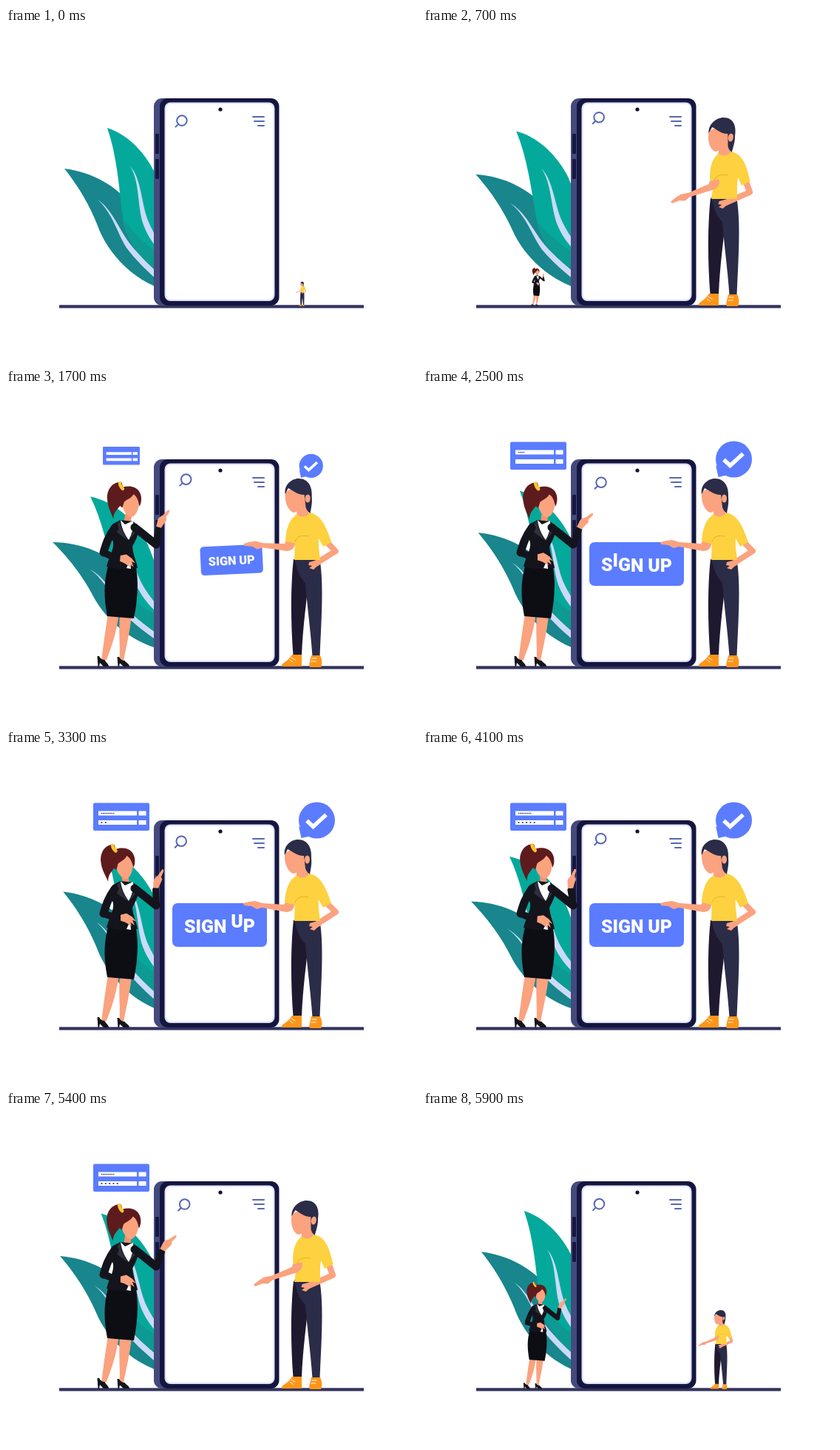
These frames come from a looping animation (556 by 450 pixels, 6000 ms). An HTML page:

```html
<!DOCTYPE html>
<html lang="en">
<head>
<meta charset="utf-8">
<title>Sign up</title>
<style>
  html, body { margin: 0; width: 100%; height: 100%; overflow: hidden; background: #fff; }
  svg { display: block; width: 556px; height: 450px; }
  .skin { fill: #fba27f; }
  .coat { fill: #14141d; }
  .hair { fill: #5e1b1d; }
  .navy { fill: #2b2c48; }
  .tee { fill: #fdd13f; }
  .blue { fill: #5b7cff; }
  .line { fill: none; stroke-linecap: round; stroke-linejoin: round; }
  #word { font: 800 30px sans-serif; font-stretch: 75%; fill: #fff; }
</style>
</head>
<body>
<svg viewBox="0 0 556 450">
  <g id="leaves">
    <path fill="#18868c" d="M79 190C118 195 150 214 170 240C192 267 206 305 222 356C180 346 144 313 127 275C114 240 98 214 79 190Z"/>
    <path fill="#cbdaf8" d="M124 232C146 247 153 275 172 297C184 311 196 322 212 337V347C190 328 175 313 163 297C150 277 145 251 124 232Z"/>
    <path fill="#04a99b" d="M137 135C168 145 190 172 202 197C216 230 222 290 220 336C186 320 162 288 158 258C153 215 150 172 137 135Z"/>
    <path fill="#0c9a92" d="M158 258C174 278 190 296 220 312V336C186 320 162 288 158 258Z"/>
    <path fill="#cbdaf8" d="M168 187C183 203 183 236 192 260C197 272 203 283 210 292V304C198 291 189 277 184 260C178 236 180 205 168 187Z"/>
  </g>

  <rect x="72" y="374.3" width="412" height="4.2" fill="#33345c"/>
  <rect x="200" y="95" width="60" height="280" rx="11" fill="#454a7d"/>
  <rect x="202" y="143" width="5" height="27" rx="1" fill="#16173f"/>
  <rect x="202" y="177" width="5" height="27" rx="1" fill="#16173f"/>
  <rect x="208" y="95" width="161.5" height="280" rx="11" fill="#15163f"/>
  <rect x="215.5" y="101.5" width="147" height="266.500" rx="7" fill="#fff" stroke="#dcdff8" stroke-width="2"/>
  <circle cx="290" cy="110" r="2.6" fill="#11122f"/>
  <path class="line" stroke="#5866b4" stroke-width="2" d="M334 120H349M336 126H349M341 132H349"/>
  <g id="lens" class="line" stroke="#5866b4" stroke-width="2">
    <circle r="6.800"/><path d="M-5 5L-8.500 8.500"/>
  </g>

  <g id="form">
    <rect class="blue" x="118" y="71.500" width="76" height="37.500" rx="2"/>
    <path fill="#fff" d="M125 82.500h52v6h-52zM179.500 82.500h10v6h-10zM125 95h52v6h-52zM179.500 95h10v6h-10z"/>
    <g id="dots" fill="#33345c"></g>
  </g>

  <g id="check">
    <path class="blue" d="M396 103L399.500 119L413 116Z"/>
    <circle class="blue" cx="420.500" cy="95" r="24.500"/>
    <path fill="none" stroke="#fff" stroke-width="5.500" d="M407 95.500L415.500 103.500L433 87.500"/>
  </g>

  <g id="button">
    <rect class="blue" x="225" y="207" width="128" height="59" rx="7"/>
    <g id="word"></g>
  </g>

  <g id="woman">
    <path class="skin" d="M138 304H153C149 328 146 340 136 366L129 367C132 345 134 328 138 304ZM154 304H170C168 328 163 345 159 368L153.500 369C155 350 152 330 154 304Z"/>
    <path class="coat" d="M123.500 361H126C128 365 131 366 133.500 366C135 370 139 371 139 375H132L127 370L126 375H124.500ZM150.500 362H153C155 366 158 367 160.500 367C162 370 167 371 167 375H159L154 370.500L153 375H151.500Z"/>
    <path fill="#0d0d14" d="M139 236H175C180 260 178 285 173 310C160 309 148 308 137 307C132 280 132 260 139 236Z"/>
    <path id="neck" class="line" stroke="#f29370" stroke-width="9"/>
    <path class="coat" d="M145 182L155 177L172 179L178 184C181 195 176 203 171 213C172 225 177 234 178 242C165 244 150 244 136 240C140 225 146 218 145 207C141 195 138 189 145 182Z"/>
    <path fill="#fff" d="M155 177L161 183L172 178C173 188 170 197 166 204C160 196 156 187 155 177Z"/>
    <path fill="#30303d" d="M154 177C155 188 160 198 166 205L149 193L152 188L149 186ZM172 179C174 189 170 199 166 205L176 193L174 189L177 187Z"/>
    <path fill="#fff" d="M163 242L168 231L169 243Z"/>
    <g id="head">
      <path class="hair" d="M146 128C134 127 126 139 128 152C129 161 133 168 138 178C137 170 142 165 147 158C150 149 150 138 146 128Z"/>
      <path class="skin" d="M148 152C152 145 159 141 164 142C169 145 172 151 171 159C170 167 166 174 161 174C155 173 148 164 148 152Z"/>
      <circle class="skin" cx="149" cy="157" r="3.500"/>
      <path class="hair" d="M143 138C149 131 163 131 169 137C175 143 175 153 172 159C170 151 168 146 163 143C160 149 155 150 151 154L149 162C141 158 139 147 143 138Z"/>
      <path class="line" stroke="#ffc52e" stroke-width="4.500" d="M143.500 129C144 132 146 135 148 136.500"/>
    </g>
    <path class="line" stroke="#14141d" stroke-width="11" d="M147 188C138 200 135 211 132 221"/>
    <g id="belly">
      <path class="line" stroke="#14141d" stroke-width="9.500" d="M132 221L154 229"/>
      <path class="skin" d="M155 223L163 221L171 226L176 232L171 230L174 237L168 233L170 238L161 233L155 231Z"/>
    </g>
    <path class="line" stroke="#14141d" stroke-width="11" d="M174 187L203 210"/>
    <g id="wave">
      <path class="line" stroke="#14141d" stroke-width="9" d="M203.500 210V189"/>
      <path class="skin" d="M200 186L201 178C201 174 204 172 207 170L213 162C215 161 216 163 215 165L211.500 172L213 175L210 181L207 187Z"/>
    </g>
  </g>

  <g id="man">
    <path fill="#1f1930" d="M389 230H412C410 265 402 310 400 360H388.500C385 315 385 265 389 230Z"/>
    <path class="navy" d="M390 228H424C430 260 427 305 424.500 361H414.500C412 325 407 290 405 262C398 255 393 245 390 228Z"/>
    <path fill="#ff9518" d="M387 359H400V375H373C372 370 381 369 387 359ZM413 360H425C428 366 428 371 426 376H411C409 371 412 367 413 360Z"/>
    <path class="line" stroke="#fff" stroke-width="1" d="M386 363L391 366M384 366L388 369M414 364H420M413 368H419"/>
    <g id="torso">
      <path id="sideArm" class="line" stroke="#fba27f" stroke-width="8"/>
      <path id="fist" class="skin" d="M-7 -3L4 -6L8 0L3 3L-1 7L-7 5L-3 2L-8 1Z"/>
      <path class="tee" d="M392 169C398 173 404 173 410 167C425 170 432 183 440 207L429 213L423 202C422 212 424 220 425 231H390L391 200Z"/>
      <path id="sleeve" class="tee" d="M395 168.500C383 174 378 188 377 206L391 210L402 190Z"/>
      <path class="line" stroke="#e5b329" stroke-width="1" d="M391 206C393 199 400 197 409 199"/>
      <g id="face">
        <path class="skin" d="M393 150H409V169C404 174 396 173 393 169Z"/>
        <path class="skin" d="M377 140C385 132 399 134 404 143C404 156 398 166 388 167C381 164 376 153 377 140Z"/>
        <path class="navy" d="M377 142C375 130 385 121 395 121C408 121 414 132 413 146C414 154 412 162 411 168C408 166 406 163 405 160L403 143C393 143 386 136 381 134Z"/>
        <ellipse class="skin" cx="407.500" cy="148" rx="3.500" ry="5.500"/>
      </g>
      <g id="reach">
        <path class="skin" d="M378 206L390 209C390 215 386 219 379 219L346 213L339 215L332 211L322 210L321 207L329 205L337 204L347 207L376 209Z"/>
      </g>
    </g>
  </g>
</svg>

<script>
const LOOP = 6000, STEP = 100, TURN = Math.PI * 2;
const $ = id => document.getElementById(id);
const move = (id, value) => $(id).setAttribute('transform', value);
const zoom = (x, y, s) => `translate(${x} ${y}) scale(${s}) translate(${-x} ${-y})`;
const clamp = v => Math.min(1, Math.max(0, v));
const ease = (t, a, b) => { const u = clamp((t - a) / (b - a)); return u * u * (3 - 2 * u); };
const pulse = (t, a, b, c, d) => ease(t, a, b) - ease(t, c, d);
const swing = (t, peak) => Math.cos(TURN * (t - peak) / 3000);

// Linear lookup in a [time, value] table
function track(keys, t) {
  const i = keys.findIndex(k => k[0] >= t);
  if (i < 1) return keys[i < 0 ? keys.length - 1 : 0][1];
  const [a, va] = keys[i - 1], [b, vb] = keys[i];
  return va + (vb - va) * (t - a) / (b - a);
}

const manSize = [[0, .13], [100, .45], [200, .86], [300, 1.07], [400, 1.05], [500, 1.01], [600, 1],
  [5600, 1], [5700, 1.06], [5800, .86], [5900, .42], [6000, .13]];
const womanSize = [[600, 0], [700, .21], [800, .6], [900, .94], [1000, 1.07], [1100, 1.04], [1200, 1],
  [5600, 1], [5700, 1.06], [5800, .94], [5900, .58], [6000, 0]];

function make(tag, parent, attrs) {
  const el = document.createElementNS('http://www.w3.org/2000/svg', tag);
  for (const k in attrs) el.setAttribute(k, attrs[k]);
  return parent.appendChild(el);
}

const rows = [
  { y: 85.5, n: 8, gap: 2.3, r: .85, start: 2100, every: 100 },
  { y: 98, n: 5, gap: 5.3, r: 1.1, start: 2900, every: 200 }
];
const dots = rows.flatMap(row => Array.from({ length: row.n }, (_, i) => ({
  time: row.start + row.every * (i + 1),
  el: make('circle', $('dots'), { cx: 129.5 + i * row.gap, cy: row.y, r: row.r })
})));

const LABEL = 'SIGN UP', SPAN = 96, SIZE = 30;
const FONTS = ['Liberation Sans Narrow', 'Noto Sans', 'Open Sans', 'Roboto'];
const letters = [...LABEL].map(ch => {
  const el = make('text', $('word'), {});
  el.textContent = ch;
  return el;
});

// Takes the narrowest face, then sizes it to the label width
function layWord() {
  const options = FONTS.map(name => {
    const family = `"${name}", Roboto, sans-serif`;
    $('word').style.fontFamily = family;
    const widths = letters.map((el, i) => LABEL[i] === ' ' ? 7 : el.getComputedTextLength());
    return { family, widths, total: widths.reduce((a, b) => a + b) };
  });
  const best = options.reduce((a, b) => b.total < a.total ? b : a);
  const fit = Math.min(1.04, SPAN / best.total);
  $('word').style.fontFamily = best.family;
  $('word').style.fontSize = SIZE * fit + 'px';
  let x = 289 - fit * best.total / 2;
  letters.forEach((el, i) => {
    el.setAttribute('x', x);
    x += best.widths[i] * fit;
  });
  return 238 + SIZE * fit * .355;
}
const baseline = layWord();

function drawMan(t) {
  const low = 1 - pulse(t, 1200, 1800, 4500, 5000);
  move('man', zoom(400, 376, track(manSize, t)));
  move('torso', `translate(0 232) skewX(${-6 * low}) translate(0 -232)`);
  move('sleeve', `rotate(${-14 * low} 395 171)`);
  move('reach', `translate(${10 * low} ${-low}) rotate(${-28 * low} 381 213)`);
  const ex = 446 - 5 * low, ey = 219 + 3 * low, hx = 418 - 10 * low;
  $('sideArm').setAttribute('d', `M434 207L${ex} ${ey}L${hx} 237`);
  move('fist', `translate(${hx} 237)`);
}

function drawWoman(t) {
  const lean = (1 + swing(t, 2000)) / 2;
  move('woman', zoom(153, 376, track(womanSize, t)));
  move('head', `translate(${9 * lean} ${-lean}) rotate(${4 * lean} 160 165)`);
  $('neck').setAttribute('d', `M163 183L${160 + 7 * lean} 168`);
  move('wave', `rotate(${4 + 16 * swing(t, 2350)} 203.5 210)`);
  move('belly', `rotate(${2 + 3 * swing(t, 1500)} 132 221)`);
}

function render(t) {
  move('leaves', `rotate(${-3.6 * (1 - swing(t, 0))} 212 330)`);
  const a = TURN * (t / 3000 + .39);
  move('lens', `translate(${240.5 + 3.3 * Math.cos(a)} ${123 + 3.3 * Math.sin(a)})`);

  move('form', zoom(156, 90.3, pulse(t, 1300, 1960, 5550, 5850)));
  move('check', zoom(398, 121, pulse(t, 1300, 1960, 4850, 5400)));
  const s = pulse(t, 1300, 1960, 4200, 4700);
  move('button', zoom(336, 220, s) + ` rotate(${-8 * (1 - s)} 289 236)`);

  dots.forEach(d => d.el.setAttribute('visibility', t >= d.time ? 'inherit' : 'hidden'));
  letters.forEach((el, i) => {
    const u = clamp(1 - Math.abs(t - 2300 - 200 * i) / 260);
    el.setAttribute('y', baseline - 7 * Math.sin(u * Math.PI / 2) ** 2);
  });
  drawMan(t);
  drawWoman(t);
}

const begin = performance.now();
function tick() {
  const t = (performance.now() - begin) % LOOP;
  render(Math.floor(t / STEP) * STEP);
  requestAnimationFrame(tick);
}
tick();
</script>
</body>
</html>
```
